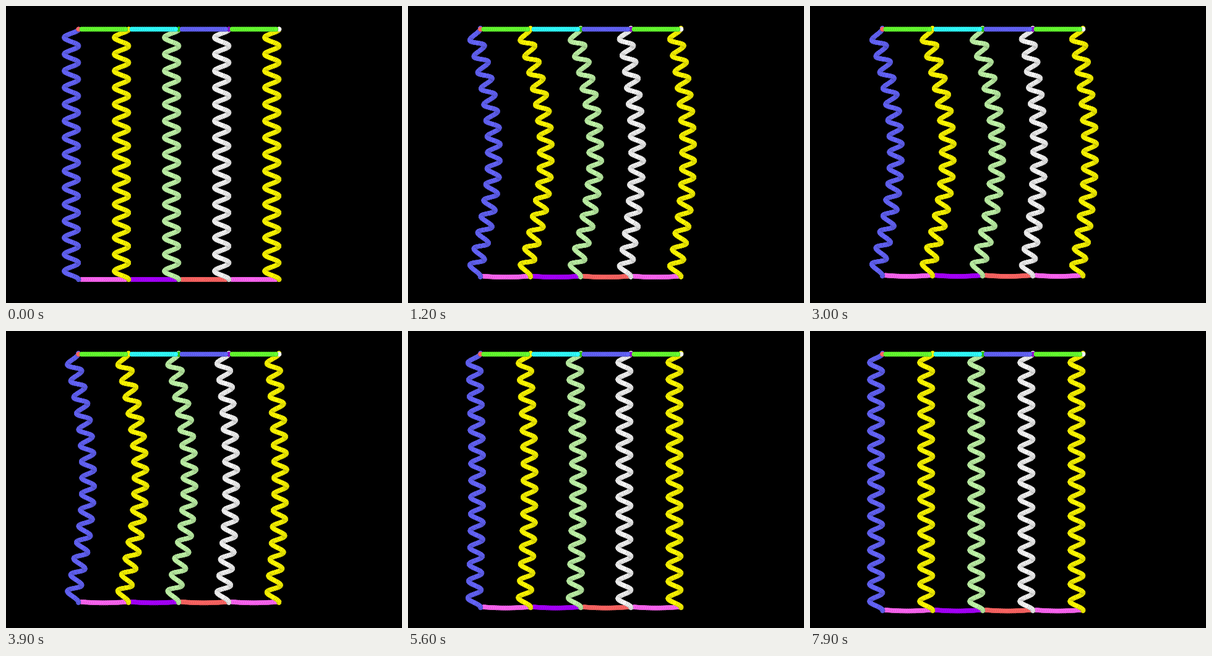
An HTML page with a canvas for the animation above (8 s loop, 640x480 px).

```html
<!DOCTYPE html>
<html lang="en">
<head>
<meta charset="utf-8">
<title>Hanging springs</title>
<style>
html, body { margin: 0; width: 100%; height: 100%; overflow: hidden; background: #000; }
canvas { display: block; width: 640px; height: 480px; }
</style>
</head>
<body>
<canvas id="stage" width="640" height="480"></canvas>
<script>
const ctx = document.getElementById('stage').getContext('2d');
const LOOP = 8000, STEP = 100;
const TOP = 37.5, LEFT = 117.3, GAP = 81;
const TURNS = 15, PER_TURN = 24, BEAD = 4.2;

const BLUE = '#6464fa', YELLOW = '#fffa00', MINT = '#c0f5a8', WHITE = '#f5f5f5';
const GREEN = '#66ff30', CYAN = '#30ffff', PINK = '#ff66f5', PURPLE = '#a800ff', SALMON = '#ff6664';

const topBars = [GREEN, CYAN, BLUE, GREEN];
const topPins = [SALMON, YELLOW, '#28c800', '#9600d2', WHITE];
const bottomBars = [PINK, PURPLE, SALMON, PINK];
const bottomPins = [BLUE, YELLOW, MINT, '#5ad2be', '#faa028'];

// bow: widest sideways swing; start: when it sets in; settle: time taken to hang straight again.
const springs = [
  { color: BLUE, bow: 32, start: 200, settle: 3600 },
  { color: YELLOW, bow: 35, start: 200, settle: 4000 },
  { color: MINT, bow: 34, start: 200, settle: 3700 },
  { color: WHITE, bow: 20.5, start: 200, settle: 2750 },
  { color: YELLOW, bow: 22, start: 400, settle: 2200 }
];

function ease(from, to, t) {
  const u = Math.min(1, Math.max(0, (t - from) / (to - from)));
  return u * u * (3 - 2 * u);
}

const jolt = t => t < 500 ? Math.sin(Math.PI * t / 500) : 0;
const barHeight = t => 442 + 4 * jolt(t) - 7.3 * ease(0, 1700, t) + 15.8 * ease(2700, 7300, t);
const barSag = t => 2 * ease(0, 600, t);
const coilRadius = t => 11.6 - 1.1 * ease(0, 500, t);
const bowAt = (s, t) =>
  s.bow * ease(s.start, 1000, t) * (1 - ease(2900, 2900 + s.settle, t)) - 9 * jolt(t);
const rippleAt = t => 1.5 * Math.exp(-(((t - 500) / 150) ** 2));

const sprites = {};
function sprite(color) {
  if (sprites[color]) return sprites[color];
  const c = document.createElement('canvas');
  c.width = c.height = 32;
  const g = c.getContext('2d');
  const shade = g.createRadialGradient(14, 13, 1, 16, 16, 16);
  shade.addColorStop(0.7, 'rgba(0,0,0,0)');
  shade.addColorStop(0.9, 'rgba(0,0,0,0.16)');
  shade.addColorStop(1, 'rgba(0,0,0,0.45)');
  g.arc(16, 16, 15.5, 0, 2 * Math.PI);
  for (const fill of [color, shade]) {
    g.fillStyle = fill;
    g.fill();
  }
  return sprites[color] = c;
}

function bead(x, y, color) {
  ctx.drawImage(sprite(color), x - BEAD, y - BEAD, 2 * BEAD, 2 * BEAD);
}

const pinX = i => LEFT + GAP * i;

function drawBar(y, sag, bars, pins) {
  pins.forEach((color, i) => bead(pinX(i), y, color));
  const count = 24, inset = BEAD + 1;
  bars.forEach((color, i) => {
    for (let n = 0; n <= count; n++) {
      const d = inset + (GAP - 2 * inset) * n / count, u = d / GAP;
      bead(pinX(i) + d, y + 4 * sag * u * (1 - u), color);
    }
  });
}

// Bead order from back to front.
const total = TURNS * PER_TURN;
const angle = n => 2 * Math.PI * n / PER_TURN;
const order = Array.from({ length: total + 1 }, (_, n) => n)
  .sort((a, b) => Math.sin(angle(b)) - Math.sin(angle(a)) || a - b);

function drawSpring(spring, i, t) {
  const bottom = barHeight(t), radius = coilRadius(t);
  const bow = bowAt(spring, t), ripple = rippleAt(t);
  const offset = s => bow * Math.sin(Math.PI * s) + ripple * Math.sin(2 * Math.PI * s);
  const lean = s => Math.atan(Math.PI / (bottom - TOP) *
    (bow * Math.cos(Math.PI * s) + 2 * ripple * Math.cos(2 * Math.PI * s)));
  const y0 = TOP + radius * Math.sin(lean(0));
  const y1 = bottom + radius * Math.sin(lean(1));
  // The first and last half turns stretch a little as the coil tightens.
  const slack = 1.3 * (11.6 - radius);
  for (const n of order) {
    const s = n / total, tilt = lean(s), reach = radius * Math.cos(angle(n));
    const ends = slack * (Math.exp(-60 * s) - Math.exp(-60 * (1 - s)));
    bead(pinX(i) - radius + offset(s) + reach * Math.cos(tilt),
      y0 + (y1 - y0) * s - ends - reach * Math.sin(tilt), spring.color);
  }
}

function draw(t) {
  ctx.fillStyle = '#000';
  ctx.fillRect(0, 0, 640, 480);
  drawBar(barHeight(t), barSag(t), bottomBars, bottomPins);
  springs.forEach((spring, i) => drawSpring(spring, i, t));
  drawBar(TOP, 0, topBars, topPins);
}

const start = performance.now();
let shown = -1;
function tick() {
  const t = Math.floor((performance.now() - start) % LOOP / STEP) * STEP;
  if (t !== shown) draw(shown = t);
  requestAnimationFrame(tick);
}
tick();
</script>
</body>
</html>
```
